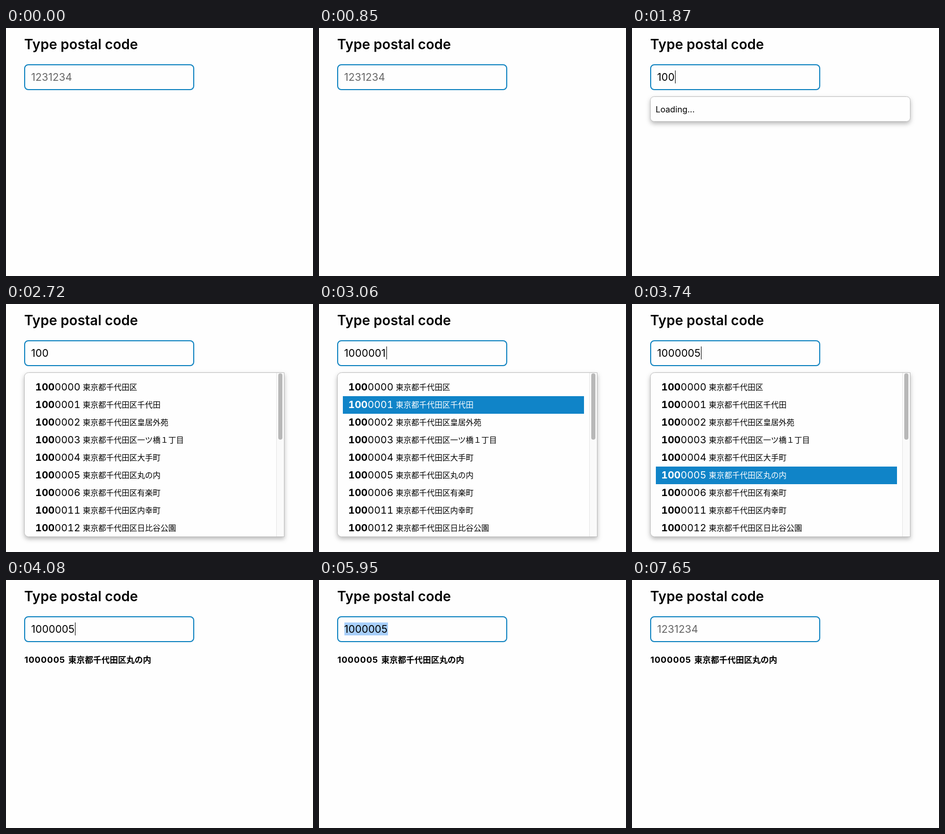
An HTML page for the animation above (7990 ms loop, 592 by 479 pixels).

```html
<!DOCTYPE html>
<html lang="en">
<head>
<meta charset="utf-8">
<title>Postal code lookup</title>
<style>
  html, body { margin: 0; width: 100%; height: 100%; overflow: hidden; background: #fefefe; }
  svg { display: block; width: 592px; height: 479px; }
  text { font-family: Inter, "Noto Sans CJK JP", "Noto Sans CJK", sans-serif; fill: #000; white-space: pre; }
  .title { font-size: 26.4px; font-weight: 640; letter-spacing: .05px; }
  .value { font-size: 20px; font-weight: 440; letter-spacing: .1px; }
  .value.hint { fill: #666; }
  .code { font-size: 19.2px; font-variant-numeric: tabular-nums; }
  .code .match { font-weight: 700; }
  .area { font-family: "Noto Sans CJK JP", "Noto Sans CJK", sans-serif; font-size: 15px; font-weight: 500; }
  .picked text { fill: #fff; }
  .result .num { font-size: 16.6px; font-weight: 650; letter-spacing: .75px; }
  .result .area { font-size: 16px; font-weight: 700; }
  .panel { fill: #fefefe; stroke: #bdbdbd; filter: drop-shadow(0 4px 4px rgba(0, 0, 0, .27)); }
</style>
</head>
<body>
<svg viewBox="0 0 592 479" xmlns="http://www.w3.org/2000/svg">
  <rect width="592" height="479" fill="#fefefe"/>
  <text class="title" x="35" y="41.3">Type postal code</text>

  <rect x="36" y="71" width="326" height="48" rx="7" fill="#fefefe" stroke="#1083c0" stroke-width="2"/>
  <rect id="selection" x="49" y="82" width="84" height="25" fill="#a8cffa"/>
  <text id="value" class="value" x="48.5" y="102"></text>
  <rect id="caret" y="82" width="1" height="25"/>

  <g id="loading">
    <rect class="panel" x="35.5" y="132.5" width="501" height="48" rx="7"/>
    <text x="45.5" y="163" font-size="16.2">Loading...</text>
  </g>

  <g id="list">
    <path class="panel" d="M43.5 132.5H536.5V449.5H43.5a8 8 0 0 1-8-8V140.5a8 8 0 0 1 8-8z"/>
    <rect x="521" y="133" width="15" height="316" fill="#fafafa"/>
    <rect x="521" y="133" width="1" height="316" fill="#e6e6e6"/>
    <rect x="525" y="134" width="8" height="128" rx="4" fill="#b8b8b8"/>
    <rect id="bar" x="46" width="465" height="34" fill="#1084c8"/>
    <g id="rows"></g>
  </g>

  <g id="result" class="result">
    <text class="num" x="35.5" y="160">1000005</text>
    <text class="area" x="120" y="160">東京都千代田区丸の内</text>
  </g>
</svg>
<script>
const LOOP = 7990, ROW = 34;
const $ = id => document.getElementById(id);

const WARD = '東京都千代田区';
const places = [
  ['0000', ''], ['0001', '千代田'], ['0002', '皇居外苑'],
  ['0003', '一ツ橋１丁目'], ['0004', '大手町'], ['0005', '丸の内'],
  ['0006', '有楽町'], ['0011', '内幸町'], ['0012', '日比谷公園']
];

$('rows').innerHTML = places.map(([tail, town], i) => {
  const y = i * ROW;
  return `<g><text class="code" x="56.5" y="${167 + y}"><tspan class="match">100</tspan>${tail}</text>` +
    `<text class="area" x="148" y="${166 + y}">${WARD}${town}</text></g>`;
}).join('');
const rows = [...$('rows').children];

// Each track holds [start, value] pairs; a value stays until the next start.
const typed = [[0, ''], [1700, '10'], [1870, '100']];
const picked = [[0, -1]];
for (let i = 0; i < 6; i++) {
  const start = 2890 + i * 170;
  typed.push([start, '100' + places[i][0]]);
  picked.push([start, i]);
}
typed.push([6290, '']);

const panel = [[0, ''], [1870, 'loading'], [2210, 'list'], [4080, 'result']];
const caret = [0, 340, 850, 1360, 2380, 2890, 4250, 4760, 5270, 6290, 6630, 7140, 7650]
  .map((start, i) => [start, i % 2 === 1]);

function at(track, t) {
  let value;
  for (const [start, v] of track) if (start <= t) value = v;
  return value;
}

const show = (id, on) => $(id).setAttribute('visibility', on ? 'visible' : 'hidden');

function caretX(text) {
  let x = 49;
  for (const c of text) x += c === '1' ? 9.5 : 12.4;
  return Math.round(x);
}

function draw(t) {
  const text = at(typed, t), view = at(panel, t), row = at(picked, t);
  const open = view === 'list';

  $('value').textContent = text || '1231234';
  $('value').classList.toggle('hint', !text);
  $('caret').setAttribute('x', caretX(text));
  show('caret', at(caret, t));
  show('selection', t >= 5610 && t < 6290);

  for (const id of ['loading', 'list', 'result']) show(id, view === id);
  show('bar', open && row >= 0);
  $('bar').setAttribute('y', 144 + Math.max(row, 0) * ROW);
  rows.forEach((r, i) => r.classList.toggle('picked', i === row));
}

function tick(now) {
  draw(now % LOOP);
  requestAnimationFrame(tick);
}
draw(0);
requestAnimationFrame(tick);
</script>
</body>
</html>
```
